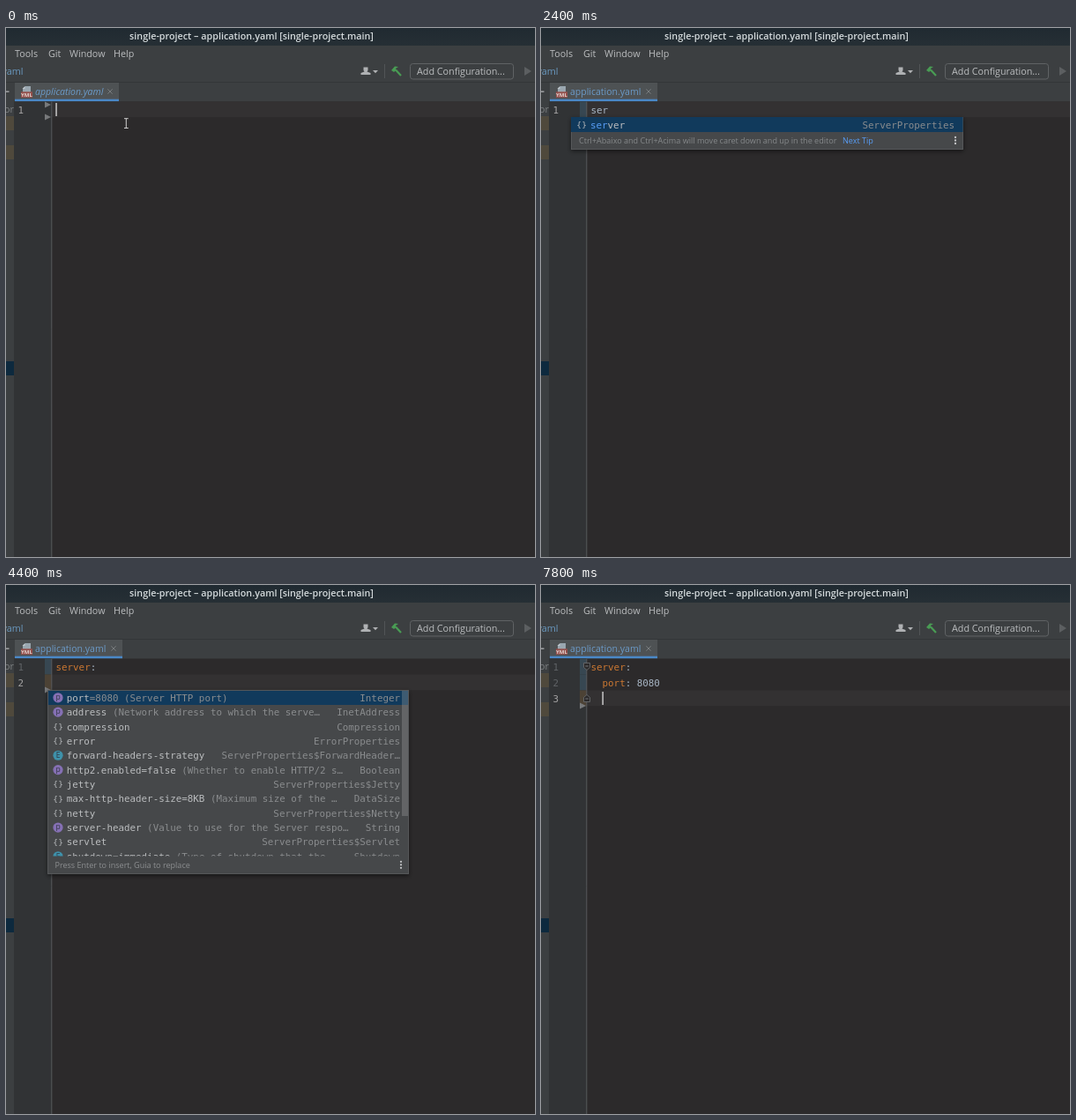
These frames come from a looping animation (600 by 600 pixels, 8 s). An HTML page with a canvas:

```html
<!DOCTYPE html>
<html lang="en">
<head>
<meta charset="utf-8">
<title>YAML completion</title>
<style>
  html, body { margin: 0; width: 100%; height: 100%; overflow: hidden; background: #2c2a2b; }
  canvas { display: block; width: 600px; height: 600px; }
</style>
</head>
<body>
<canvas id="stage" width="600" height="600"></canvas>
<script>
const ctx = document.getElementById('stage').getContext('2d');
const LOOP = 8000;
const COL = 6.53, TEXT_X = 56.5, LINE_H = 18;
const MONO = '10.85px "DejaVu Sans Mono", monospace';
const UI = '10.75px "Open Sans", sans-serif';
const HINT = '9.05px "Open Sans", sans-serif';
const BRIGHT = '#bbbdbf', DIM = '#8a8c8e', ORANGE = '#cc7832', BLUE = '#589df6';
const EDITOR_BG = '#2c2a2b', SELECTED = '#113a5c';

// Each entry: start time, lines of text, caret column.
const EDITS = [
  [0, [''], 0],
  [300, ['s'], 1],
  [400, ['se'], 2],
  [1800, ['ser'], 3],
  [2700, ['server:', ''], 2],
  [4700, ['server:', '  port: '], 8],
  [6000, ['server:', '  port: 8'], 9],
  [6100, ['server:', '  port: 80'], 10],
  [6300, ['server:', '  port: 808'], 11],
  [6500, ['server:', '  port: 8080'], 12],
  [7300, ['server:', '  port: 8080', ''], 2]
];
const CARET_TOGGLES = [1100, 1600, 2300, 2700, 3500, 4000, 4400, 4700, 5900, 6000];

// Icon, name, description, type.
const PROPERTIES = [
  ['p', 'port', '=8080 (Server HTTP port)', 'Integer'],
  ['p', 'address', ' (Network address to which the serve…', 'InetAddress'],
  ['{}', 'compression', '', 'Compression'],
  ['{}', 'error', '', 'ErrorProperties'],
  ['E', 'forward-headers-strategy', '', 'ServerProperties$ForwardHeader…'],
  ['p', 'http2.enabled=false', ' (Whether to enable HTTP/2 s…', 'Boolean'],
  ['{}', 'jetty', '', 'ServerProperties$Jetty'],
  ['{}', 'max-http-header-size=8KB', ' (Maximum size of the …', 'DataSize'],
  ['{}', 'netty', '', 'ServerProperties$Netty'],
  ['p', 'server-header', ' (Value to use for the Server respo…', 'String'],
  ['{}', 'servlet', '', 'ServerProperties$Servlet'],
  ['E', 'shutdown=immediate', ' (Type of shutdown that the …', 'Shutdown']
];

const between = (t, a, b) => t >= a && t < b;

function rect(x, y, w, h, color) {
  ctx.fillStyle = color;
  ctx.fillRect(x, y, w, h);
}

function text(str, x, y, color, font = MONO, align = 'left') {
  ctx.font = font;
  ctx.fillStyle = color;
  ctx.textAlign = align;
  ctx.fillText(str, x, y);
}

function path(points, fill, stroke, width = 1) {
  ctx.beginPath();
  points.forEach(([x, y], i) => i ? ctx.lineTo(x, y) : ctx.moveTo(x, y));
  ctx.closePath();
  if (fill) { ctx.fillStyle = fill; ctx.fill(); }
  if (stroke) { ctx.strokeStyle = stroke; ctx.lineWidth = width; ctx.stroke(); }
}

function line(x1, y1, x2, y2, color, width = 1) {
  ctx.beginPath();
  ctx.moveTo(x1, y1);
  ctx.lineTo(x2, y2);
  ctx.strokeStyle = color;
  ctx.lineWidth = width;
  ctx.stroke();
}

function disc(x, y, r, color) {
  ctx.beginPath();
  ctx.arc(x, y, r, 0, Math.PI * 2);
  ctx.fillStyle = color;
  ctx.fill();
}

function drawHeader() {
  rect(0, 0, 600, 84, '#3c3f41');
  const bar = ctx.createLinearGradient(0, 0, 0, 20);
  bar.addColorStop(0, '#202a31');
  bar.addColorStop(1, '#262f35');
  rect(0, 0, 600, 20, bar);
  text('single-project – application.yaml [single-project.main]', 278.5, 13.3, '#d5dbdd',
    '600 10.78px "Open Sans", sans-serif', 'center');
  [['Tools', 10], ['Git', 48], ['Window', 72], ['Help', 122]].forEach(([label, x]) =>
    text(label, x, 33, BRIGHT, UI));
  text('yaml', 19.5, 53, '#6a9ac2', UI, 'right');

  // Toolbar
  path([[405.5, 44.5], [410.5, 44.5], [410.5, 48], [409.5, 49.5], [413.5, 51], [413.5, 53],
    [402.5, 53], [402.5, 51], [406.5, 49.5], [405.5, 48]], '#afb1b3');
  path([[416, 48], [422, 48], [419, 51.2]], '#afb1b3');
  line(429.5, 41, 429.5, 57, '#515456');
  line(442, 47.5, 448, 54, '#499c54', 2.2);
  path([[437, 48], [441, 43.5], [445, 44], [442, 46], [442.5, 48], [440, 50]], '#499c54');
  ctx.beginPath();
  ctx.roundRect(458.5, 40.5, 117, 17.5, 3);
  ctx.strokeStyle = '#606365';
  ctx.lineWidth = 1;
  ctx.stroke();
  text('Add Configuration...', 466, 53, BRIGHT, UI);
  path([[588, 44], [596, 49], [588, 54]], '#5c5f61');
  line(0, 61.5, 600, 61.5, '#333638');
}

function drawTab(preview) {
  const right = preview ? 128 : 132;
  rect(10, 62, right - 10, 20, '#4e5254');
  rect(10, 80.7, right - 10, 2.8, '#4a88c7');
  path([[22, 66], [28, 66], [28, 74], [19, 74], [19, 69]], '#9aa7b0');
  path([[18.5, 69], [21.5, 66], [21.5, 69]], '#c0c8cd');
  rect(17, 72.3, 13, 6.7, '#94504c');
  text('YML', 23.5, 78, '#e2d5d2', '700 6px "Open Sans", sans-serif', 'center');
  text('application.yaml', 33, 76, '#6b9bc9', (preview ? 'italic ' : '') + '10.5px "Open Sans", sans-serif');
  const x = right - 10;
  line(x - 2.7, 69.3, x + 2.7, 74.7, '#777b7d');
  line(x + 2.7, 69.3, x - 2.7, 74.7, '#777b7d');
}

function drawSidebar() {
  rect(0, 83, 9, 517, '#3c3f41');
  rect(0, 71.5, 3.5, 1.3, '#afb1b3');
  text('or', -2, 96, '#7d8082', UI);
  rect(0, 100, 9, 16, '#4f493c');
  rect(0, 133, 9, 16, '#4f493c');
  rect(0, 378, 9, 16, '#0d293e');
}

function gutterArrow(y) {
  path([[44, y - 3.5], [51, y], [44, y + 3.5]], '#77797b');
}

function foldMark(y, dir) {
  path([[48.5, y - 4 * dir], [55.5, y - 4 * dir], [55.5, y + dir], [52, y + 4 * dir], [48.5, y + dir]],
    EDITOR_BG, '#67696b', 0.9);
  line(50.3, y - 0.5 * dir, 53.7, y - 0.5 * dir, '#7b7d7f', 0.9);
}

function drawCode(str, y) {
  const [, indent, key, rest] = str.match(/^( *)(\w+(?=:))?(.*)$/);
  const x = TEXT_X + indent.length * COL;
  if (key) text(key, x, y, ORANGE);
  text(rest, x + (key || '').length * COL, y, '#a9b7c6');
}

function drawEditor(t) {
  const [, lines, column] = EDITS.findLast(e => t >= e[0]);
  const current = lines.length - 1;
  const top = i => 83.5 + i * LINE_H;
  rect(9, 83.5, 591, 516.5, EDITOR_BG);
  rect(9, 83.5, 43, 516.5, '#313335');
  rect(52, top(current), 548, 17.7, '#333132');

  if (t >= 300) {
    lines.forEach((str, i) => {
      const blank = i > 0 && !str;
      rect(44, top(i), 8, LINE_H, blank ? '#4c4235' : '#374752');
    });
  }
  line(51.8, 83.5, 51.8, 600, '#57595b');

  lines.forEach((str, i) => {
    const y = 96.6 + i * LINE_H;
    text(i + 1, 13.5, y, i === current ? '#a4a3a3' : '#606366');
    drawCode(str, y);
  });

  if (t < 300) [87, 101].forEach(gutterArrow);
  else if (lines.length > 1 && !lines[current]) gutterArrow(101 + current * LINE_H);

  if (t >= 5000) {
    foldMark(92.5, 1);
    foldMark(t >= 7500 ? 128.5 : 110.5, -1);
  }
  if (CARET_TOGGLES.filter(time => t >= time).length % 2 === 0)
    rect(TEXT_X + column * COL - 0.2, 85 + current * LINE_H, 1.5, 15, '#c8c8c8');
}

function popupFrame(x, y, w, h) {
  ctx.save();
  ctx.shadowColor = 'rgba(0,0,0,.5)';
  ctx.shadowBlur = 5;
  ctx.shadowOffsetY = 2;
  rect(x, y, w, h, '#46484a');
  ctx.restore();
  ctx.strokeStyle = '#555759';
  ctx.lineWidth = 1;
  ctx.strokeRect(x + 0.5, y + 0.5, w - 1, h - 1);
}

function moreDots(x, y) {
  [-3.5, 0, 3.5].forEach(d => disc(x, y + d, 1.15, '#c3c5c7'));
}

function itemIcon(kind, x, y) {
  if (kind === '{}') {
    text('{', x - 3, y + 3.3, '#b4b7b9', '9.5px "DejaVu Sans Mono", monospace', 'center');
    text('}', x + 3, y + 3.3, '#b4b7b9', '9.5px "DejaVu Sans Mono", monospace', 'center');
    return;
  }
  disc(x, y, 5.6, kind === 'p' ? '#8570b4' : '#3e91aa');
  text(kind, x, y + (kind === 'p' ? 2.3 : 3.2), '#2f3440', '8.5px "Open Sans", sans-serif', 'center');
}

function drawServerPopup(t) {
  const matched = t >= 1800 ? 'ser' : 'se';
  popupFrame(34, 101, 445, 37);
  rect(34, 101, 444.5, 17, t >= 1900 ? SELECTED : '#4c5054');
  itemIcon('{}', 46, 110);
  text(matched, 56, 113.8, BLUE);
  text('server'.slice(matched.length), 56 + matched.length * COL, 113.8, BRIGHT);
  text('ServerProperties', 469, 113.8, DIM, MONO, 'right');
  text('Ctrl+Abaixo and Ctrl+Acima will move caret down and up in the editor', 43, 131, '#85888a', HINT);
  text('Next Tip', 342, 131, BLUE, HINT);
  moreDots(470, 127.5);
}

function drawPropertyPopup() {
  popupFrame(47, 119, 410, 209);
  rect(48, 120, 408, 16, SELECTED);
  ctx.save();
  ctx.beginPath();
  ctx.rect(48, 119, 408, 188.5);
  ctx.clip();
  PROPERTIES.forEach(([icon, name, tail, type], i) => {
    const y = 127.8 + i * 16.36;
    itemIcon(icon, 59, y);
    text(name, 68.7, y + 4, BRIGHT);
    text(tail, 68.7 + name.length * COL, y + 4, DIM);
    text(type, 447, y + 4, DIM, MONO, 'right');
  });
  rect(449, 120, 7, 142, 'rgba(166,166,166,.3)');
  ctx.restore();
  text('Press Enter to insert, Guia to replace', 55.5, 320.5, '#8c8e90', HINT);
  moreDots(448, 317.3);
}

function drawPointer(t) {
  if (t < 500) {
    line(136.3, 103, 136.3, 113, '#d0d0d0', 1);
    line(134, 102.7, 138.7, 102.7, '#d0d0d0', 1);
    line(134, 113.5, 138.7, 113.5, '#d0d0d0', 1);
  } else if (t < 800) {
    path([[134.8, 106.5], [134.8, 119], [137.6, 116.4], [139.8, 121], [141.8, 120],
      [139.8, 115.7], [143.4, 115.2]], '#1c1c1c', '#e4e4e4', 0.9);
  }
}

function draw(t) {
  drawHeader();
  drawTab(t < 300);
  drawEditor(t);
  drawSidebar();
  if (between(t, 500, 2700)) drawServerPopup(t);
  if (between(t, 3500, 4700)) drawPropertyPopup();
  drawPointer(t);
}

const start = performance.now();
function tick() {
  draw((performance.now() - start) % LOOP);
  requestAnimationFrame(tick);
}
tick();
</script>
</body>
</html>
```
